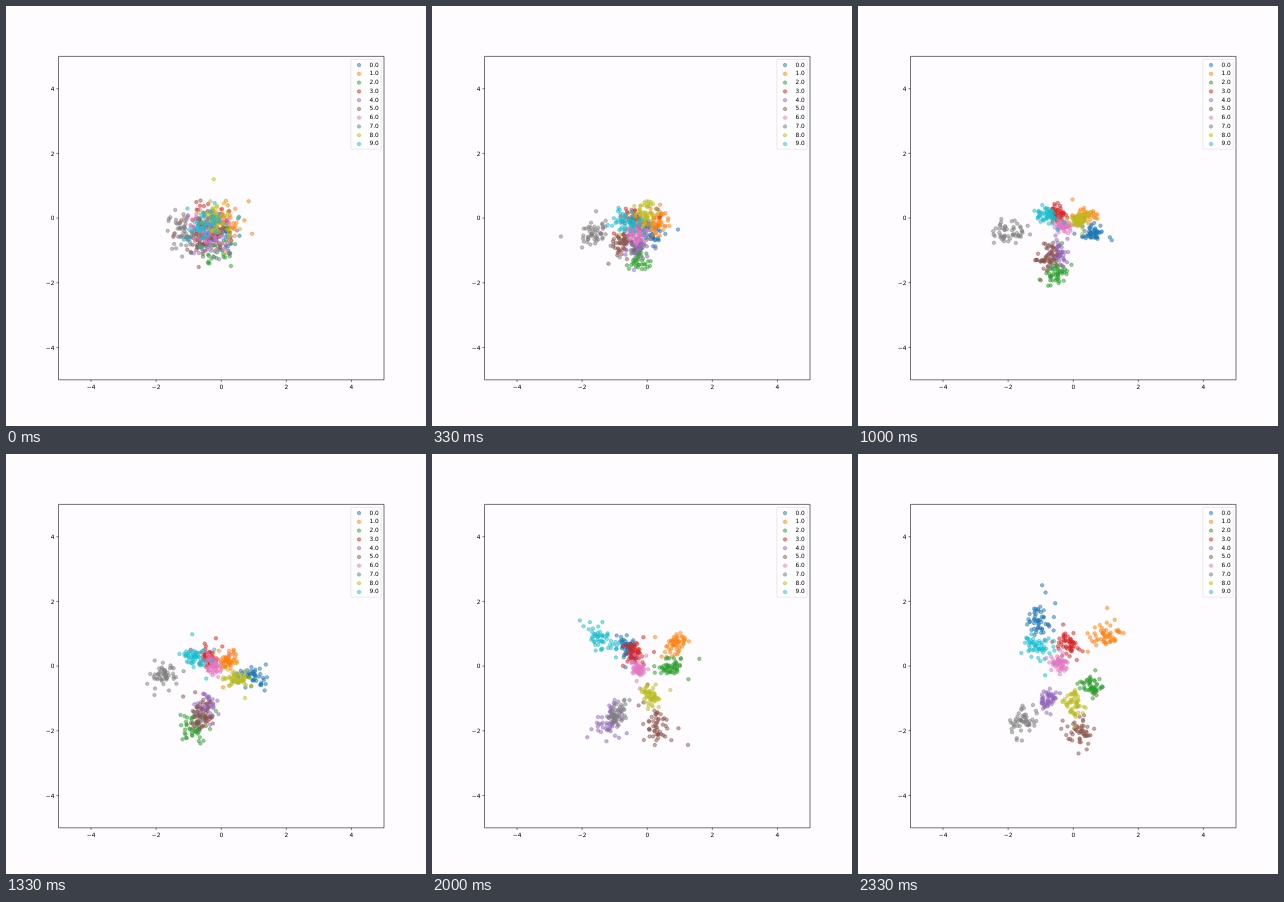
Animation, 420 px wide and 420 px high, one loop 2660 ms. Source, as an HTML page:

```html
<!DOCTYPE html>
<html lang="en">
<head>
<meta charset="utf-8">
<title>Drifting clusters</title>
<style>
  html, body { margin: 0; width: 100%; height: 100%; overflow: hidden; background: #fefcfe; }
  svg { display: block; width: 100vw; height: 100vh; }
  text { font: 5.83px "DejaVu Sans", sans-serif; fill: #000; text-rendering: geometricPrecision; }
  circle { fill-opacity: .5; stroke-opacity: .6; stroke-width: .7; }
  .axes { fill: none; stroke: #000; stroke-width: .55; }
</style>
</head>
<body>
<svg id="stage" viewBox="0 0 420 420"></svg>
<script>
const LOOP = 2660;
const POSES = 8;
const POINTS_PER_CLASS = 52;
const HUB = [208, 221];

// The places that the centre of each class passes through once the clusters have parted.
const CLASSES = [
  { color: '#1f77b4', path: [[222, 231], [246, 222], [159, 195], [195, 194], [181, 166]] },
  { color: '#ff7f0e', path: [[231, 215], [221, 207], [241, 195], [244, 190], [246, 183]] },
  { color: '#2ca02c', path: [[209, 257], [190, 274], [245, 228], [240, 213], [233, 232]] },
  { color: '#d62728', path: [[200, 213], [203, 205], [210, 203], [203, 199], [209, 190]] },
  { color: '#9467bd', path: [[204, 246], [200, 252], [181, 224], [179, 266], [191, 246]] },
  { color: '#8c564b', path: [[185, 241], [195, 262], [228, 275], [225, 273], [221, 276]] },
  { color: '#e377c2', path: [[203, 228], [207, 212], [231, 213], [207, 216], [201, 209]] },
  { color: '#7f7f7f', path: [[148, 230], [160, 220], [169, 248], [186, 258], [165, 269]] },
  { color: '#bcbd22', path: [[214, 206], [229, 224], [220, 226], [219, 242], [215, 248]] },
  { color: '#17becf', path: [[189, 213], [188, 205], [195, 188], [168, 182], [179, 193]] }
];

const lerp = (a, b, t) => a + (b - a) * t;
const lerpPoint = (p, q, t) => p.map((v, i) => lerp(v, q[i], t));

function randomFrom(seed) {
  return () => (seed = (seed * 16807) % 2147483647) / 2147483647;
}

function along(path, position) {
  const i = Math.min(Math.floor(position), path.length - 2);
  return lerpPoint(path[i], path[i + 1], position - i);
}

const dot = (color, x, y) =>
  `<circle cx="${x.toFixed(2)}" cy="${y.toFixed(2)}" r="1.75" fill="${color}" stroke="${color}"/>`;

// Clusters part from the hub during the first two poses, then follow their paths.
// Each cloud is stretched along the line from the hub to its centre.
function drawPose(index) {
  const random = randomFrom(7919 * (index + 3));
  const normal = () => (random() + random() + random() + random() - 2) * Math.sqrt(3);
  const parted = Math.min(1, index / 2);
  const position = index < 4 ? Math.max(0, index / 2 - 1) : index - 3;

  const dots = CLASSES.map(({ color, path }) => {
    const [x, y] = lerpPoint(HUB, along(path, position), lerp(.5, 1, parted));
    const distance = Math.hypot(x - HUB[0], y - HUB[1]);
    const cos = (x - HUB[0]) / distance, sin = (y - HUB[1]) / distance;
    const length = lerp(8.5, 4 + distance * .07, parted);
    const width = length * lerp(1, .7, parted);
    let cloud = '';
    for (let i = 0; i < POINTS_PER_CLASS; i++) {
      const reach = random() < .12 ? 2 : 1;
      const u = normal() * length * reach, v = normal() * width * reach;
      cloud += dot(color, x + u * cos - v * sin, y + u * sin + v * cos);
    }
    return cloud;
  });
  return `<g class="pose" visibility="hidden">${dots.join('')}</g>`;
}

function drawAxes() {
  let frame = 'M52.5 50.4H378V373.8H52.5Z', labels = '';
  for (let value = -4; value <= 4; value += 2) {
    const x = 215.25 + value * 32.55, y = 212.1 - value * 32.34;
    const label = String(value).replace('-', '\u2212');
    frame += `M${x} 373.8v2.04M52.5 ${y}h-2.04`;
    labels += `<text x="${x}" y="382.5" text-anchor="middle">${label}</text>` +
              `<text x="48.4" y="${y + 2.1}" text-anchor="end">${label}</text>`;
  }
  return `<path class="axes" d="${frame}"/>${labels}`;
}

function drawLegend() {
  const rows = CLASSES.map(({ color }, k) => {
    const y = 59.1 + k * 8.76;
    return dot(color, 353, y) + `<text x="363.5" y="${y + 1.5}">${k}.0</text>`;
  });
  return '<rect x="344.9" y="53.4" width="30.3" height="89.8" rx="1.2" fill="#fff" fill-opacity=".8" ' +
         'stroke="#ccc" stroke-opacity=".8" stroke-width=".5"/>' + rows.join('');
}

const stage = document.getElementById('stage');
const poses = Array.from({ length: POSES }, (_, i) => drawPose(i));
stage.innerHTML = poses.join('') + drawAxes() + drawLegend();
const groups = stage.querySelectorAll('.pose');

// Poses change three times a second, on whole hundredths.
const startOf = index => Math.round(index * 100 / 3) * 10;

function render() {
  const time = performance.now() % LOOP;
  groups.forEach((group, i) => {
    const shown = time >= startOf(i) && time < startOf(i + 1);
    group.setAttribute('visibility', shown ? 'visible' : 'hidden');
  });
  requestAnimationFrame(render);
}
render();
</script>
</body>
</html>
```
